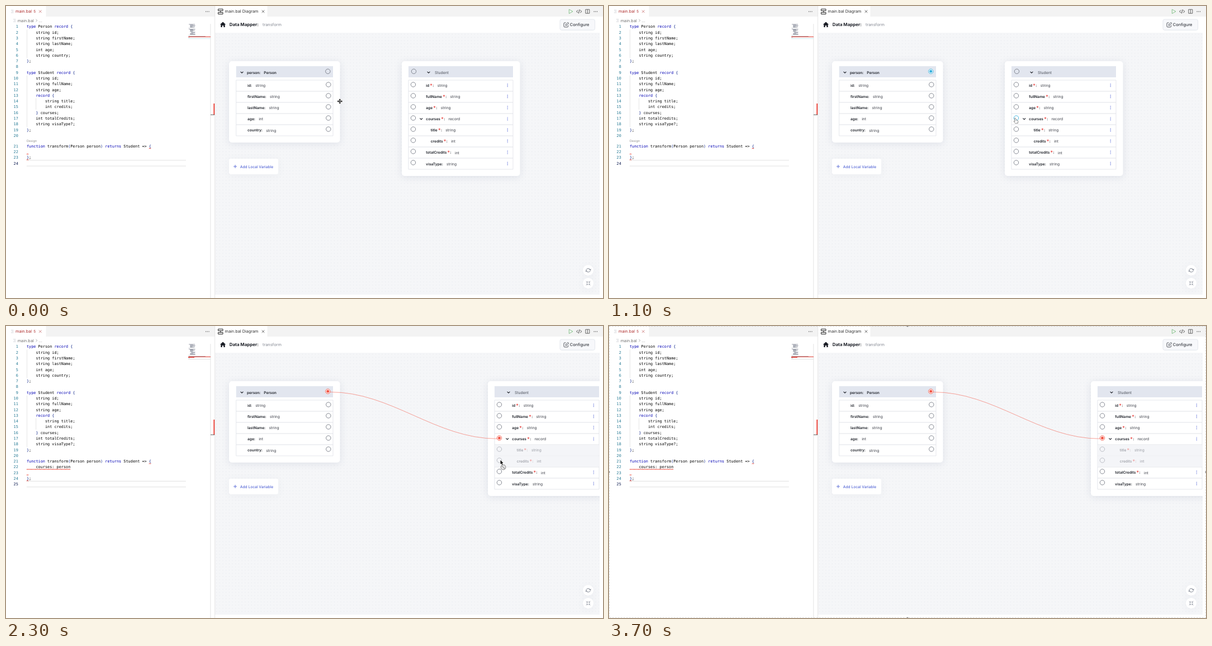
Write an HTML page with a canvas that moves like this. It is 1068 px wide and 524 px high and loops after 4000 ms.

```html
<!DOCTYPE html>
<html lang="en">
<head>
<meta charset="utf-8">
<title>Data Mapper</title>
<style>
html, body { margin: 0; width: 100%; height: 100%; overflow: hidden; background: #fff; }
canvas { display: block; width: 1068px; height: 524px; }
</style>
</head>
<body>
<canvas id="stage"></canvas>
<script>
const W = 1068, H = 524, LOOP = 4000, STEP = 100;
const canvas = document.getElementById('stage');
const ratio = window.devicePixelRatio || 1;
canvas.width = W * ratio;
canvas.height = H * ratio;
const c = canvas.getContext('2d');

const UI = 'Inter, sans-serif', MONO = '"DejaVu Sans Mono", monospace';
const CHAR = 4.13, LINE = 10.28, CODE_X = 36.9;
const BLUE = '#5567d5', RED = '#f25545', CYAN = '#36b0dd', GREY = '#757a85', INK = '#1d2028';
const MUTED = '#999ca4';

// ---------- drawing helpers ----------
function rect(x, y, w, h, fill, radius = 0, stroke) {
  c.beginPath();
  c.roundRect(x, y, w, h, radius);
  if (fill) { c.fillStyle = fill; c.fill(); }
  if (stroke) { c.strokeStyle = stroke; c.lineWidth = 0.8; c.stroke(); }
}

function path(d, { x = 0, y = 0, stroke, fill, width = 1 }) {
  const shape = new Path2D(d);
  c.save();
  c.translate(x, y);
  c.lineWidth = width;
  if (stroke) { c.strokeStyle = stroke; c.stroke(shape); }
  if (fill) { c.fillStyle = fill; c.fill(shape); }
  c.restore();
}

function disc(x, y, r, fill, stroke, width = 1) {
  c.beginPath();
  c.arc(x, y, r, 0, 7);
  if (fill) { c.fillStyle = fill; c.fill(); }
  if (stroke) { c.strokeStyle = stroke; c.lineWidth = width; c.stroke(); }
}

// Draws text centred on y and returns the x where it ends.
function text(s, x, y, size, color, weight = 400, family = UI, align = 'left') {
  c.font = `${weight} ${size}px ${family}`;
  c.textAlign = align;
  c.textBaseline = 'alphabetic';
  c.fillStyle = color;
  c.fillText(s, x, y + size * 0.36);
  return x + c.measureText(s).width;
}

function dots(x, y, dx, dy, color, r = 0.7) {
  for (let i = -1; i <= 1; i++) disc(x + i * dx, y + i * dy, r, color);
}

function card(x, y, w, h, radius, shadow = 0.14) {
  c.save();
  c.shadowColor = `rgba(90,105,140,${shadow})`;
  c.shadowBlur = 14 * ratio;
  c.shadowOffsetY = 2 * ratio;
  rect(x, y, w, h, '#fff', radius);
  c.restore();
}

const chevron = (x, y) => path('M-2.4 -1.2L0 1.2L2.4 -1.2', { x, y, stroke: INK, width: 1.1 });
const cross = (x, y, color) => path('M-2.3 -2.3L2.3 2.3M2.3 -2.3L-2.3 2.3', { x, y, stroke: color, width: 0.8 });

function port(x, y, color = GREY, filled = false) {
  disc(x, y, 4.2, filled ? '#fff' : null, color, 0.9);
  if (filled) disc(x, y, 2.5, color);
}

// ---------- code editor ----------
const SHARED = `type Person record {
    string id;
    string firstName;
    string lastName;
    int age;
    string country;
};

type Student record {
    string id;
    string fullName;
    string age;
    record {
        string title;
        int credits;
    } courses;
    int totalCredits;
    string visaType?;
};

function transform(Person person) returns Student => {
`;
const EMPTY_CODE = (SHARED + '\n};\n').split('\n');
const LINKED_CODE = (SHARED + '    courses: person\n\n};\n').split('\n');

function squiggle(col, count, y) {
  const x0 = CODE_X + col * CHAR, x1 = x0 + count * CHAR;
  c.beginPath();
  for (let x = x0, up = 0; x <= x1; x += 1.15, up ^= 1) c.lineTo(x, y + (up ? -0.7 : 0.7));
  c.strokeStyle = '#e51400';
  c.lineWidth = 0.7;
  c.stroke();
}

function codeLine(line, y) {
  let col = 0;
  for (const part of line.split(/(\b(?:type|record|function|returns)\b|[{}()])/)) {
    const color = /^[{}()]$/.test(part) ? '#0c2488'
      : /^(type|record|function|returns)$/.test(part) ? '#0000b4' : '#000';
    text(part, CODE_X + col * CHAR, y, 6.86, color, 400, MONO);
    col += part.length;
  }
}

function editor(linked, settling) {
  const lines = linked ? LINKED_CODE : EMPTY_CODE;
  const lineY = n => 37 + (n - 1) * LINE + (!linked && n > 20 ? 8.6 : 0);
  const last = lines.length;

  rect(0, 0, 373.5, 19, '#f3f3f3');
  rect(0, 0, 71.5, 19, '#fff');
  path('M9 7.4H13.5M10 9.7H13.5M9 12H13.5', { stroke: '#c3c6cc', width: 0.7 });
  text('main.bal', 17, 9.8, 7.3, '#ad2a2a');
  text('5', 49.3, 9.8, 6.6, '#ad2a2a');
  cross(61.3, 9.8, '#c46a6a');
  dots(360.3, 10, 2.7, 0, '#555');
  path('M13 23.8H17.5M14 26H17.5M13 28.2H17.5', { stroke: '#c3c6cc', width: 0.7 });
  text('main.bal', 20.7, 26, 7.3, '#707070');
  path('M53.5 23.8L55.8 26L53.5 28.2', { stroke: '#8a8a8a', width: 0.7 });
  text('...', 58.6, 26, 7.3, '#707070');

  const guide = (x, from, to) => rect(x, lineY(from) - 5.1, 0.6, (to - from + 1) * LINE, '#d6d6d6');
  guide(37, 2, 6);
  guide(37, 10, 18);
  guide(53.5, 14, 15);

  for (const side of [-5.1, 5.1]) rect(CODE_X, lineY(last) + side - 0.4, 285, 0.8, '#d8d8d8');

  lines.forEach((line, i) => {
    const y = lineY(i + 1);
    text(i + 1, 21.8, y, 6.86, i + 1 === last ? '#0b1a4f' : '#237893', 400, MONO, 'right');
    codeLine(line, y);
    const indent = line.search(/\S/);
    if (indent >= 0) {
      c.globalAlpha = 0.55;
      rect(327 + indent * 0.55, 32.5 + i * 1.08, (line.length - indent) * 0.55, 0.8, '#222a44');
      c.globalAlpha = 1;
    }
  });

  if (!linked) {
    text('Design', 37, 241.6, 5.6, '#919191');
    squiggle(53, 1, lineY(21) + 4.4);
    squiggle(0, 1, lineY(22) + 4.2);
    squiggle(0, 1, lineY(23) + 4.2);
  } else if (settling) {
    squiggle(0, 1, lineY(25) + 4.6);
  } else {
    squiggle(53, 1, lineY(21) + 4.4);
    squiggle(0, 19, lineY(22) + 4.4);
    squiggle(0, 1, lineY(23) + 4.2);
    squiggle(0, 1, lineY(24) + 4.2);
  }

  // minimap marks, overview ruler and scrollbar
  rect(326, linked ? 59.2 : 57.9, 40, 0.7, linked ? '#d4d4d4' : '#9bd0ec');
  rect(365.5, 32, 0.8, 492, '#dcdcdc');
  if (settling) {
    rect(365.5, 32, 8, 327.5, '#c1c1c1');
    rect(366, 195, 7.5, 0.9, '#6b4444');
    rect(371.5, 195.5, 2, 6.5, '#c23b3b');
  } else {
    rect(326, 54.7, 40, 1.2, '#e2574e');
    if (linked) rect(326, 55.7, 11, 1.1, '#d4261c');
    const top = linked ? 168 : 175;
    rect(371.3, top, 2.4, 195 - top, '#f0463c');
    rect(366, 194.7, 7.5, 0.9, '#444');
  }
  rect(373.3, 0, 0.8, H, '#e0e0e0');
}

// ---------- diagram ----------
const INPUTS = [['id', 'string'], ['firstName', 'string'], ['lastName', 'string'], ['age', 'int'], ['country', 'string']];
const OUTPUTS = [['id*', 'string'], ['fullName*', 'string'], ['age*', 'string'], ['courses*', 'record'],
  ['title*', 'string'], ['credits*', 'int'], ['totalCredits*', 'int'], ['visaType', 'string']];

function field([name, type], x, y, muted) {
  const color = muted ? MUTED : INK;
  const weight = muted ? 500 : 600;
  let end = text(name.replace('*', ''), x, y, 6.6, color, weight);
  if (name.endsWith('*')) {
    text('*', end + 1.2, y, 9.2, muted ? '#f09a9a' : '#e53935');
    end += 6.2;
  }
  end = text(':', end, y, 6.6, color, weight);
  text(type, end + 6.3, y, 6.7, muted ? MUTED : '#3b3e47');
}

function table(x, w, count) {
  rect(x, 133, w, count * 20, '#fff', 0, '#dfe1e7');
  for (let i = 1; i < count; i++) rect(x, 132.6 + i * 20, w, 0.8, '#dfe1e7');
}

function inputCard(color, filled) {
  card(399, 99, 198.5, 146, 5);
  rect(411.7, 108, 173.3, 20, '#e2e6ef');
  chevron(422, 119);
  text('person:', 431, 119.2, 6.6, INK, 600);
  text('Person', 461.3, 119.2, 6.6, INK, 600);
  port(575.8, 117.3, color, filled);
  table(411.7, 173.3, 5);
  INPUTS.forEach((f, i) => {
    field(f, 432, 142.7 + i * 20.1, false);
    port(576.8, 141 + i * 20);
  });
}

function outputCard(linked, coursesColor) {
  c.save();
  c.translate(linked ? 154 : 0, 0);
  card(708, 99, 211.5, 206, 5);
  rect(720, 108, 187, 20, '#e2e6ef');
  const shift = linked ? -11 : 0;
  if (!linked) port(729.5, 117.3);
  chevron(756 + shift, 119);
  text('Student', 767 + shift, 119.2, 6.8, '#4a4e58');
  table(720, 187, 8);
  OUTPUTS.forEach((f, i) => {
    const nested = i === 4 || i === 5, muted = linked && nested, y = 142.7 + i * 20.07;
    if (muted) rect(720.4, 133.4 + i * 20, 186.2, 19.2, '#f4f5f8');
    field(f, nested ? 759.7 : 751.3, y, muted);
    port(728.5, 141 + i * 20, muted ? '#b4b7be' : i === 3 ? coursesColor : GREY, i === 3 && linked);
    if (!muted) dots(897.2, y - 0.5, 0, 2.3, BLUE);
  });
  chevron(742.8, 202.5);
  c.restore();
}

function toolbar() {
  rect(374, 0, W - 374, 19, '#f3f3f3');
  rect(374, 0, 93.5, 19, '#fff');
  path('M379.5 5.5H388V8.5H379.5ZM379.5 11.5H388V14.5H379.5ZM383.8 8.5V11.5', { stroke: '#222', width: 1 });
  text('main.bal Diagram', 391.5, 9.8, 7.3, '#333');
  cross(460, 9.8, '#444');
  path('M1007.3 6L1014 9.8L1007.3 13.6Z', { stroke: '#6cb873', width: 0.8 });
  path('M1023 7.3L1020.7 9.8L1023 12.3M1027.3 7.3L1029.6 9.8L1027.3 12.3M1026 6.3L1024.3 13.3', { stroke: '#333', width: 0.9 });
  path('M1036.8 6.2H1043.8V13.2H1036.8ZM1040.3 6.2V13.2', { stroke: '#444', width: 0.8 });
  dots(1054.8, 10, 2.7, 0, '#444');

  path('M0 -5L5.2 -.3H3.7V4.4H1.2V1.3H-1.2V4.4H-3.7V-.3H-5.2Z', { x: 388, y: 33.6, fill: INK });
  text('Data Mapper:', 399.7, 33.6, 7.9, INK, 700);
  text('transform', 459, 33.6, 7.4, '#868a94');
  rect(991, 24, 62.5, 19.3, '#f7f8fb', 3, '#dfe2ea');
  path('M1001.5 30H999.4Q998 30 998 31.4V36.4Q998 37.8 999.4 37.8H1004.2Q1005.6 37.8 1005.6 36.4V34.6M1001.2 35L1001.7 32.9L1005.2 29.4L1006.8 31L1003.3 34.5Z', { stroke: INK, width: 0.75 });
  text('Configure', 1008.8, 33.7, 7.4, INK);
}

function grid() {
  rect(374, 48, 688, 470, '#f5f6f8');
  c.fillStyle = '#e6e8ed';
  const pitch = 5.7;
  for (let y = 50; y < 517; y += pitch)
    for (let x = 376; x < 1061; x += pitch) c.fillRect(x, y, 1.1, 1.1);
}

function diagram(linked, picked, hovered) {
  rect(374, 0, W - 374, H, '#fff');
  grid();
  c.save();
  c.beginPath();
  c.rect(374, 48, 688, 470);
  c.clip();
  inputCard(linked ? RED : picked ? CYAN : GREY, linked || picked);
  outputCard(linked, linked ? RED : hovered ? CYAN : GREY);
  if (linked) path('M580 118.5C690 118.5 768.5 202.3 878.5 202.3', { stroke: '#f4776a', width: 0.7 });
  c.restore();

  card(399, 274, 88, 28, 3, 0.06);
  path('M-3 0H3M0 -3V3', { x: 410, y: 288, stroke: BLUE, width: 0.9 });
  text('Add Local Variable', 418.8, 288.3, 6.65, BLUE, 500);

  for (const y of [474.3, 497.5]) card(1032, y - 9.5, 19, 19, 9.5, 0.06);
  path('M-4.2 -.4Q-2.6 -3.4 .4 -3.2Q2.8 -3 3.8 -.6M1.8 -1.2L3.9 -.5L4.7 -2.5M4.2 .4Q2.6 3.4 -.4 3.2Q-2.8 3 -3.8 .6M-1.8 1.2L-3.9 .5L-4.7 2.5', { x: 1041.6, y: 474.3, stroke: '#596070', width: 0.75 });
  path('M-3.8 -3.8L-1.3 -1.3V-3.4M-1.3 -1.3H-3.4M3.8 -3.8L1.3 -1.3V-3.4M1.3 -1.3H3.4M-3.8 3.8L-1.3 1.3V3.4M-1.3 1.3H-3.4M3.8 3.8L1.3 1.3V3.4M1.3 1.3H3.4', { x: 1041.6, y: 497.5, stroke: '#6b7180', width: 0.6 });
  toolbar();
}

// ---------- pointer ----------
// [time, x, y, kind]; the kind holds until the next key.
const POINTER = [
  [0, 597.3, 171, 'move'], [200, 566, 107, 'move'], [300, 576, 117, 'hand'], [400, 620, 150, 'move'],
  [600, 732, 225, 'move'], [900, 727, 203, 'hand'], [1000, 727, 201.5, 'hand'], [1200, 726.5, 201.5, 'move'],
  [1300, 726.5, 201.5, 'move'], [1700, 880, 226, 'denied'], [1800, 887, 229, 'denied'], [2000, 893, 236, 'denied'],
  [2300, 884, 240.5, 'denied'], [2400, 884, 240.5, 'denied'], [2700, 925, 265, 'move'], [2900, 953, 290, 'move'],
  [3000, 940, 301.5, 'move'], [3200, 917.6, 315, 'move'], [3300, 917.6, 315, 'move'], [3700, 905, -10, 'none'],
];

function pointerAt(t) {
  const i = POINTER.findLastIndex(key => key[0] <= t);
  const [t0, x0, y0, kind] = POINTER[i];
  const [t1, x1, y1] = POINTER[i + 1] || [LOOP, x0, y0];
  const k = (t - t0) / (t1 - t0);
  return { x: x0 + (x1 - x0) * k, y: y0 + (y1 - y0) * k, kind };
}

const SHAPES = {
  move: 'M0 -4.6L1.9 -2.5H.6V-.6H2.5V-1.9L4.6 0L2.5 1.9V.6H.6V2.5H1.9L0 4.6L-1.9 2.5H-.6V.6H-2.5V1.9L-4.6 0L-2.5 -1.9V-.6H-.6V-2.5H-1.9Z',
  hand: 'M-.8 .2Q0 -.8 .7 .2L1.3 3.4Q2.2 2.8 2.6 3.8Q3.5 3.3 3.9 4.3Q5 4 5 5.4L4.4 8.9H0L-2 6Q-2.6 4.7 -1.3 5L-.2 5.8Z',
  denied: 'M.6 .2V7.4L2.2 6L3.4 8.8L4.6 8.3L3.4 5.6H5.6Z',
};

function pointer({ x, y, kind }) {
  if (kind === 'none') return;
  const d = SHAPES[kind];
  if (kind === 'hand') return path(d, { x, y, fill: '#fff', stroke: '#111', width: 1 });
  path(d, { x, y, stroke: '#fff', width: 1.6, fill: '#000' });
  if (kind === 'denied') {
    disc(x + 5.6, y + 13, 4.3, '#e4e4e6', '#999', 1.2);
    path('M-3 -3L3 3', { x: x + 5.6, y: y + 13, stroke: '#999', width: 1.2 });
  }
}

function selectionFrame() {
  c.setLineDash([3, 2]);
  c.strokeStyle = '#999';
  c.lineWidth = 0.5;
  c.strokeRect(0.25, 0.25, W - 0.5, H - 0.5);
  c.setLineDash([]);
  for (const [x, y] of [[534, 0], [534, H], [0, 262], [W, 262]]) disc(x, y, 1.5, '#777');
}

function draw(t) {
  c.setTransform(ratio, 0, 0, ratio, 0, 0);
  c.textRendering = 'geometricPrecision';
  rect(0, 0, W, H, '#fff');
  const linked = t >= 1200;
  diagram(linked, t >= 300, t >= 900);
  editor(linked, linked && t < 1400);
  pointer(pointerAt(t));
  if (t >= 3700) selectionFrame();
}

const start = performance.now();
let shown = -1;
function tick() {
  const elapsed = Math.max(0, performance.now() - start) % LOOP;
  const t = Math.floor(elapsed / STEP) * STEP;
  if (t !== shown) draw(shown = t);
  requestAnimationFrame(tick);
}
tick();
</script>
</body>
</html>
```
